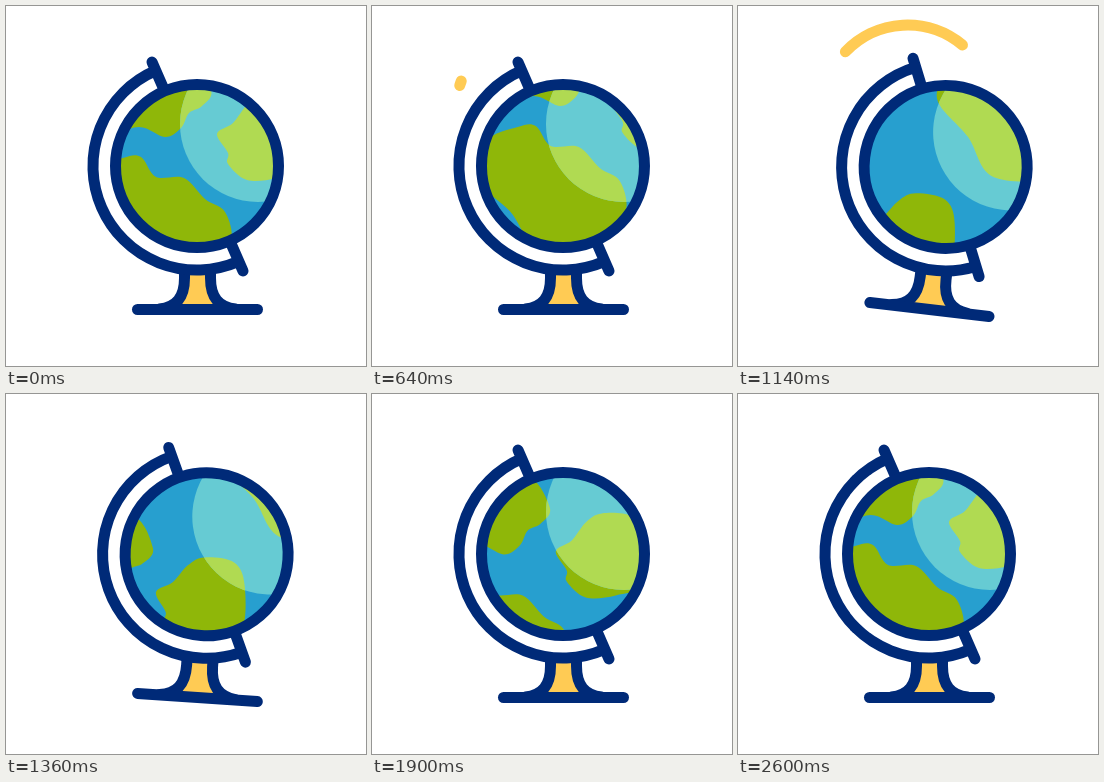
An HTML page that plays this animation: 360 by 360 pixels, repeating every 2880 ms.

```html
<!DOCTYPE html>
<html lang="en">
<head>
<meta charset="utf-8">
<title>Spinning globe</title>
<style>
  html, body { margin: 0; width: 100%; height: 100%; overflow: hidden; background: #fff; }
  svg { display: block; width: 100%; height: 100%; }
  .line { fill: none; stroke: #002a78; stroke-width: 11; stroke-linecap: round; }
  #swoosh { fill: none; stroke: #ffcb54; stroke-width: 11; stroke-linecap: round; }
</style>
</head>
<body>
<svg viewBox="0 0 360 360">
  <defs>
    <clipPath id="disc"><circle r="79"/></clipPath>
    <clipPath id="shine"><circle cx="61" cy="-42" r="78"/></clipPath>
    <path id="land"/>
    <path id="leg" d="M-13 266V272C-13 291 -21 301 -38 303"/>
  </defs>
  <path id="swoosh"/>
  <g id="globe">
    <g transform="translate(191.500 0)">
      <path d="M-13 266V272Q-13 292 -26 303H26Q13 292 13 272V266Z" fill="#ffcb54"/>
      <use href="#leg" class="line"/>
      <use href="#leg" class="line" transform="scale(-1 1)"/>
      <path class="line" d="M-60 303.500H60"/>
    </g>
    <g transform="translate(191 160)">
      <path class="line" d="M-45 -104L46 105M-41.500 -95.400A104 104 0 0 0 41.500 95.400"/>
      <g clip-path="url(#disc)">
        <circle r="79" fill="#279fcf"/>
        <use href="#land" fill="#8fb709"/>
        <g clip-path="url(#shine)">
          <circle r="79" fill="#66cbd3"/>
          <use href="#land" fill="#b0da52"/>
        </g>
      </g>
      <circle class="line" r="81.500"/>
    </g>
  </g>
</svg>
<script>
const LOOP = 2880;
const TURN = 284;            // distance the map travels in one loop
const DIR = [0.68, -0.733];  // direction of travel

// Key points of each coast at rest; "early" is a head start on re-entering
const LANDS = [
  { early: 0, pts: [[-106, 6], [-74, -8], [-56, -9], [-41, 11], [-13, 12], [8, 33],
    [28, 46], [34, 76], [12, 106], [-52, 113], [-82, 76], [-117, 42]] },
  { early: 0, pts: [[-95, -30], [-58, -39], [-32, -29], [-16, -38], [-8, -53],
    [5, -60], [14, -76], [-10, -108], [-70, -100], [-110, -60]] },
  { early: 24, pts: [[20, -32], [36, -43], [50, -61], [66, -70], [96, -67], [108, -45],
    [108, 0], [80, 12], [50, 14], [31, -2], [31, -13]] }
];

const $ = id => document.getElementById(id);
const num = v => v.toFixed(2);

function ease(t, from, to) {
  const u = Math.min(1, Math.max(0, (t - from) / (to - from)));
  return (1 - Math.cos(Math.PI * u)) / 2;
}

const tilt = t => -5 * ease(t, 200, 360) + 12 * ease(t, 360, 990) - 7 * ease(t, 1050, 1714);
const travel = t => TURN / 2 * (ease(t, 200, 1400) + ease(t, 640, 2600));

// Smooth closed curve through the points, moved along DIR
function coast(pts, move) {
  const at = i => pts[(i + pts.length) % pts.length].map((v, k) => v + move * DIR[k]);
  let d = "M" + at(0).map(num);
  pts.forEach((_, i) => {
    const [a, b, c, e] = [at(i - 1), at(i), at(i + 1), at(i + 2)];
    const c1 = b.map((v, k) => num(v + (c[k] - a[k]) / 6));
    const c2 = c.map((v, k) => num(v - (e[k] - b[k]) / 6));
    d += `C${c1} ${c2} ${c.map(num)}`;
  });
  return d + "Z";
}

// Each land leaves at the top right while its copy follows one turn behind
function map(t) {
  const move = travel(t), ahead = 1 - ease(t, 700, 1140);
  return LANDS.map(({ pts, early }) =>
    coast(pts, move) + coast(pts, move - TURN + early * ahead)).join("");
}

function swoosh(t) {
  const tail = 197 + 113 * ease(t, 1035, 1365);
  const head = 197 + 113 * ease(t, 600, 985);
  if (head - tail < 0.5) return "";
  const point = deg => {
    const a = deg * Math.PI / 180;
    return num(169.5 + 85.5 * Math.cos(a)) + " " + num(104.5 + 85.5 * Math.sin(a));
  };
  return `M${point(tail)}A85.500 85.500 0 0 1 ${point(head)}`;
}

function draw(t) {
  $("globe").setAttribute("transform", `rotate(${num(tilt(t))} 191.500 303)`);
  $("land").setAttribute("d", map(t));
  $("swoosh").setAttribute("d", swoosh(t));
}

const start = performance.now();
function tick() {
  draw((performance.now() - start) % LOOP);
  requestAnimationFrame(tick);
}
tick();
</script>
</body>
</html>
```
